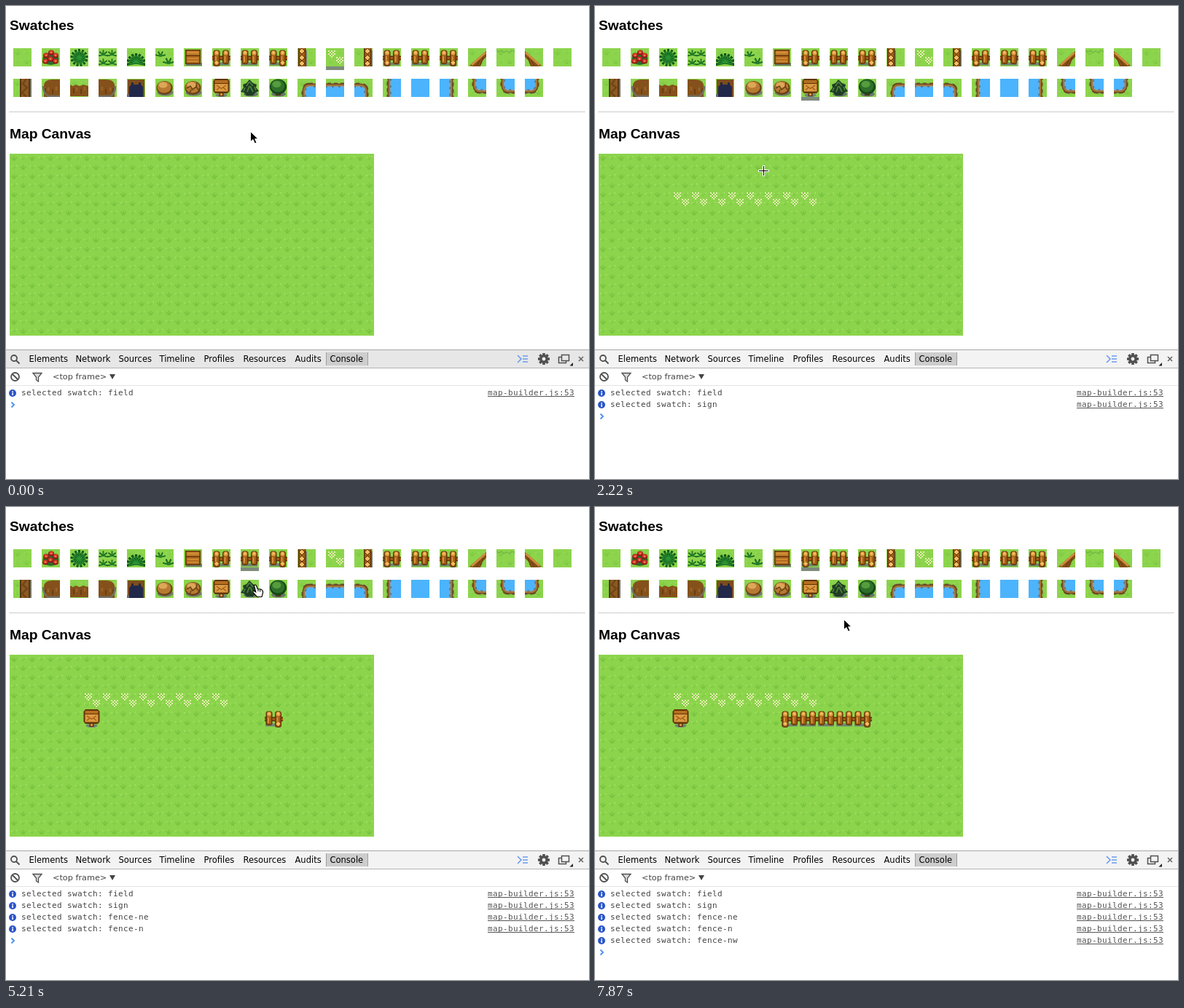
Recreate the animation shown at these times as an HTML page with a canvas. Size 800 by 650 pixels, loop 8 s.

```html
<!DOCTYPE html>
<html lang="en">
<head>
<meta charset="utf-8">
<title>Map builder</title>
<style>
html, body { margin: 0; width: 100%; height: 100%; overflow: hidden; background: #fff; }
canvas { display: block; }
</style>
</head>
<body>
<canvas id="stage" width="800" height="650"></canvas>
<script>
const ctx = document.getElementById('stage').getContext('2d');
const LOOP = 8000, TILE = 25, MAP_X = 5, MAP_Y = 203;
const UI = '"DejaVu Sans", sans-serif';
const MONO = '11px "DejaVu Sans Mono", monospace';
const WOOD = { edge: '#603408', mid: '#a35f18', light: '#d8923a', shine: '#f5bd62' };

// ---------- drawing helpers ----------
function box(color, x, y, w, h) {
  ctx.fillStyle = color;
  ctx.fillRect(x, y, w, h);
}
function oval(color, x, y, rx, ry = rx) {
  ctx.fillStyle = color;
  ctx.beginPath();
  ctx.ellipse(x, y, rx, ry, 0, 0, 7);
  ctx.fill();
}
function shape(d, fill, stroke, width = 1) {
  const path = new Path2D(d);
  if (fill) { ctx.fillStyle = fill; ctx.fill(path); }
  if (stroke) { ctx.strokeStyle = stroke; ctx.lineWidth = width; ctx.stroke(path); }
}
function text(str, x, y, font, color = '#000', spacing = 0) {
  ctx.font = font;
  ctx.letterSpacing = spacing + 'px';
  ctx.fillStyle = color;
  ctx.fillText(str, x, y);
}
function at(x, y, draw) {
  ctx.save();
  ctx.translate(x, y);
  draw();
  ctx.restore();
}
function tile(x, y, draw) {
  at(x, y, () => {
    ctx.beginPath();
    ctx.rect(0, 0, TILE, TILE);
    ctx.clip();
    draw();
  });
}

// ---------- tiles, in 25 x 25 units ----------
function grass(strength = 1) {
  box('#8cd44c', 0, 0, TILE, TILE);
  ctx.globalAlpha = strength;
  for (const [x, y] of [[6, 9], [18.5, 21.5]]) {
    shape(`M${x} ${y}l-4 -4M${x} ${y}v-6M${x} ${y}l4 -4`, null, '#79c440', 1.6);
    box('#79c440', x - 2, y - 1.5, 4, 2);
  }
  for (const [x, y] of [[18.5, 8], [6, 20.5]]) {
    shape(`M${x - 2} ${y - 2}l2 2l2 -3`, null, '#82cb46', 1.4);
    box('#a3e266', x - 4, y - 4, 1.5, 2);
    box('#a3e266', x + 3, y - 5, 1.5, 2);
  }
  ctx.globalAlpha = 1;
}
function fern(x, y, r, blades, spread) {
  for (const [color, width, length] of [['#0c5418', r / 4, 1], ['#2c9434', r / 9, 0.8]])
    for (let i = 0; i < blades; i++) {
      const a = -Math.PI / 2 + spread * (i / (blades - 1) - 0.5);
      shape(`M${x} ${y}l${Math.cos(a) * r * length} ${Math.sin(a) * r * length}`, null, color, width);
    }
}
function post(x, bottom, diamond) {
  ctx.fillStyle = WOOD.edge;
  ctx.beginPath();
  ctx.roundRect(x, 2.5, 9, bottom - 2.5, 3.5);
  ctx.fill();
  box(WOOD.mid, x + 1.5, 6, 6, bottom - 7.5);
  oval(WOOD.light, x + 4.5, 6.5, 3.2, 3.2);
  oval(WOOD.shine, x + 4.5, 6, 1.7, 2);
  box(WOOD.light, x + 2.5, 11, 2, bottom - 14);
  if (diamond) shape(`M${x + 4.5} ${bottom - 8.5}l3.5 3.5l-3.5 3.5l-3.5 -3.5z`, WOOD.shine, WOOD.mid);
}
function fence(side) {
  box('#6f8570', 1, 19.5, 22, 4);
  box(WOOD.edge, 0, 10.5, TILE, 6);
  box(WOOD.mid, 0, 12, TILE, 3);
  post(1.5, side < 0 ? 25 : 22, side < 0);
  post(14, side > 0 ? 25 : 22, side > 0);
}
function sideFence(x) {
  box('#758276', x + 10, 3, 2, 22);
  box(WOOD.edge, x, 0, 10.5, TILE);
  box(WOOD.mid, x + 1.5, 0, 7.5, TILE);
  for (const y of [4, 13, 21]) shape(`M${x + 5} ${y - 4}l4 4l-4 4l-4 -4z`, WOOD.shine, WOOD.edge);
}
function field() {
  for (const [ox, oy] of [[3, 3], [14, 12]])
    for (let i = 0; i < 5; i++)
      for (let j = 0; j < 5; j++)
        if ((i + j) % 2 === 0 && Math.abs(i - 2) + j < 5) box('#e6efb0', ox + i * 2, oy + j * 2, 2, 2);
}
function sign() {
  oval('#737f78', 12.5, 22.5, 8, 2.6);
  box(WOOD.edge, 9.5, 18, 6, 6);
  box(WOOD.light, 11, 19, 3, 4);
  shape('M4 0H21L23.5 3V17L21 20H4L1.5 17V3Z', WOOD.edge);
  box('#b56e20', 3.5, 2, 18, 4);
  box('#dc9a41', 3.5, 7, 18, 10.5);
  shape('M6 9L12.5 13.5L19 9M6 15.5L10 12M19 15.5L15 12', null, WOOD.mid, 1.4);
}
function crate() {
  box('#707c72', 3, 20, 22, 4);
  box(WOOD.edge, 2, 2, 21, 20);
  box('#c27c2c', 3.5, 3.5, 18, 6);
  box('#b36c20', 3.5, 11, 18, 9.5);
  shape('M5 6H20M5 14H20M5 18H20', null, '#d8923a', 1.3);
}
function redFlowers() {
  oval('#2b6a2c', 12.5, 14.5, 11, 8.5);
  for (const [x, y] of [[6, 10], [13, 6], [19, 10], [12, 15], [5, 18], [19, 18]]) {
    oval('#8e1717', x, y, 4, 3.6);
    oval('#d63a2c', x, y - 0.7, 3, 2.5);
    box('#f2b04e', x - 0.8, y - 1, 1.6, 1.6);
  }
}
function ramp() {
  shape('M25 4L13 14L2 24L7 25H17L19 18L25 12Z', '#875018');
  shape('M24 6L14 15L5 23', null, '#cf8c3c', 3);
  shape('M21 12L17 23M16 17L12 24', null, '#6b4010', 1.5);
}
function mirror(draw) {
  return () => { ctx.translate(TILE, 0); ctx.scale(-1, 1); draw(); };
}
function edge() {
  shape('M0 3l3 2 4-2 3 3 4-2 4 2 3-3 4 2', null, '#6fb545', 1.3);
}
function cliffSide() {
  box('#56340f', 9, 0, 14, TILE);
  box('#8d5a20', 11, 0, 10, TILE);
  shape('M18 0L13 7L19 12L12 19L18 25', null, '#70461a', 2.5);
  box('#747668', 23, 0, 2, TILE);
}
function cliffFace(corner) {
  shape(corner ? 'M3 25V8Q5 1 14 1H25V25Z' : 'M0 8l4 2 4-2 5 2 5-2 7 2V24H0Z', '#85511b');
  shape('M5 13V20M15 14V21', null, '#693f12', 2);
  shape('M9 12V17M20 11V16', null, '#9c642a', 2.5);
  if (corner) shape('M2 10Q2 20 9 24H25', null, '#707168', 2.5);
}
function cave() {
  box('#7d4d1b', 1, 1, 23, 24);
  shape('M3 25V11L6 8V5H9V8H16V5H19V8L22 11V25Z', '#22284a');
  box('#666b70', 0, 21, 3, 4);
}
function boulder(cracked) {
  oval('#737b6e', 13.5, 19, 11, 4.5);
  oval('#694014', 12.5, 12.5, 11, 9.5);
  oval('#b67a32', 12, 11.5, 9.5, 8);
  oval('#dda758', 10.5, 8.5, 6, 4);
  if (cracked) shape('M4 13l5-3 3 5 5-4 4 5M10 15l-2 5M17 12l1-7', null, '#694014', 1.5);
}
function spikyBush() {
  oval('#68756a', 14, 21, 10, 3.5);
  shape('M12 1L17 6 22 8 21 12 25 17 20 19 17 23H8L5 19 0 18 4 12 3 8 8 6Z', '#1d3d22');
  shape('M12 4L8 10M12 4L17 10M6 12L4 17M12 10L9 18M13 10L17 18M19 11L21 16', null, '#4e7e3e', 1.8);
}
function roundTree() {
  oval('#68756a', 13, 21, 10, 3.5);
  box('#5b370f', 9, 19, 7, 4);
  oval('#174719', 12.5, 11, 11.5, 10.5);
  oval('#2e7029', 12, 10, 9.5, 8.5);
  oval('#559c3d', 10.5, 7.5, 6, 4.5);
}
function water(dx, dy) {
  const left = dx < 0 ? 11 : -12, right = dx > 0 ? 14 : 37;
  const top = dy < 0 ? 11 : -12, bottom = dy > 0 ? 15 : 37;
  const shore = new Path2D();
  shore.roundRect(left, top, right - left, bottom - top, 5);
  const bank = (color, width, dash = []) => {
    ctx.strokeStyle = color;
    ctx.lineWidth = width;
    ctx.setLineDash(dash);
    ctx.stroke(shore);
  };
  bank('#6e4a24', 9);
  bank('#6e4a24', 11, [5, 4]);
  bank('#a8753a', 6);
  ctx.fillStyle = '#4bb4fd';
  ctx.fill(shore);
  bank('#4a7aa0', 1.5);
  bank('#8bd5ff', 1, [6, 3]);
  ctx.setLineDash([]);
}

const none = () => {};
const swatches = [
  [none, redFlowers,
    () => fern(12.5, 13, 12, 13, 5.8),
    () => { for (const x of [6.5, 18.5]) for (const y of [9, 21]) fern(x, y, 6.5, 5, 3.6); },
    () => fern(12.5, 20, 13, 9, 3.5),
    () => { fern(7, 11, 7, 4, 2.6); fern(18, 21, 8, 4, 2.6); },
    crate, () => fence(-1), () => fence(0), () => fence(1),
    () => sideFence(1), field, () => sideFence(13),
    () => fence(-1), () => fence(0), () => fence(1),
    ramp, edge, mirror(ramp), none],
  [cliffSide, () => cliffFace(true), () => cliffFace(false), mirror(() => cliffFace(true)),
    cave, () => boulder(false), () => boulder(true), sign, spikyBush, roundTree,
    () => water(-1, -1), () => water(0, -1), () => water(1, -1),
    () => water(-1, 0), () => water(0, 0), () => water(1, 0),
    () => water(-1, 1), () => water(-1, 1), () => water(1, 1)]
];

// ---------- story ----------
// time, swatch name, swatch column, swatch row
const selections = [
  [0, 'field', 11, 0], [2220, 'sign', 7, 1], [3870, 'fence-ne', 9, 0],
  [5060, 'fence-n', 8, 0], [6690, 'fence-nw', 7, 0]
];
// start, columns, row, sprite, end
const strokes = [
  [450, [4], 2, field], [900, [5], 2, field], [1050, [6, 7, 8], 2, field], [1190, [9, 10, 11], 2, field],
  [2520, [4], 3, sign],
  [4020, [15], 3, () => fence(1), 4170], [4170, [14], 3, () => fence(1)],
  [5800, [13], 3, () => fence(0)], [5950, [12], 3, () => fence(0)], [6090, [11], 3, () => fence(0)],
  [7430, [10], 3, () => fence(-1)]
];
// time, pointer, x, y
const pointerSteps = [
  [0, arrow, 335, 172], [150, cross, 215, 235], [300, cross, 113, 276], [450, cross, 121, 274],
  [900, cross, 157, 268], [1050, cross, 229, 270], [1190, cross, 298, 274],
  [1480, cross, 307, 235], [1630, arrow, 301, 170], [1770, hand, 294, 122], [1920, hand, 293, 109],
  [2220, cross, 231, 226], [2370, cross, 145, 279], [2520, cross, 116, 292], [2670, cross, 111, 294],
  [2970, cross, 230, 272], [3120, cross, 418, 228], [3270, arrow, 404, 150],
  [3420, hand, 376, 88], [3570, hand, 371, 74],
  [3870, arrow, 384, 182], [4020, cross, 392, 278], [4170, cross, 374, 290], [4320, cross, 367, 292],
  [4770, arrow, 350, 165], [4920, hand, 333, 82], [5060, hand, 331, 72], [5210, hand, 338, 106],
  [5360, cross, 364, 235], [5500, cross, 368, 289],
  [5800, cross, 350, 292], [5950, cross, 312, 295], [6090, cross, 281, 298],
  [6240, cross, 283, 225], [6390, hand, 289, 102], [6540, hand, 290, 67],
  [6690, hand, 291, 72], [6840, arrow, 296, 125],
  [6990, cross, 258, 240], [7140, cross, 238, 321], [7290, cross, 251, 308], [7430, cross, 262, 301],
  [7720, arrow, 315, 210], [7870, arrow, 341, 154]
];

// ---------- pointers ----------
function arrow() {
  shape('M.5 .5V14.5L4 11.5 6.5 17 9 16 6.7 10.7H11Z', '#000', '#fff');
}
function cross() {
  box('#fff', -7, -1, 15, 3);
  box('#fff', -1, -7, 3, 15);
  box('#000', -6, 0, 13, 1);
  box('#000', 0, -6, 1, 13);
}
function hand() {
  shape('M2.5 2Q4 0 5.5 2L7.2 6.5 12 7.2Q15 8.5 14.5 12L13 17.5H6.5L1 11.5Q0 9 2.5 9.5L4.7 10.7Z', '#fff', '#000', 1.2);
  shape('M8 7V10M10.7 7.5V10.5', null, '#000');
}

// ---------- page parts ----------
function drawSwatches([, , selectedColumn, selectedRow]) {
  swatches.forEach((row, r) => row.forEach((draw, c) => {
    const x = 10 + c * 39, y = 58 + r * 42;
    tile(x, y, () => { grass(0.5); draw(); });
    if (c === selectedColumn && r === selectedRow) box('#7d8b7b', x, y + TILE, TILE, 5);
  }));
}
function drawMap(t) {
  for (let r = 0; r < 10; r++)
    for (let c = 0; c < 20; c++) tile(MAP_X + c * TILE, MAP_Y + r * TILE, grass);
  for (const [start, columns, row, draw, end = LOOP] of strokes)
    if (t >= start && t < end)
      for (const c of columns) tile(MAP_X + c * TILE, MAP_Y + row * TILE, draw);
}
function drawToolbar(t) {
  box(t < 2220 ? '#e7e7e7' : '#f3f3f3', 0, 473, 800, 24);
  box('#a8a8a8', 0, 472, 800, 1);
  box('#b4b4b4', 0, 497, 800, 1);
  box('#e4e4e4', 0, 521, 800, 1);
  box('#cdcdcd', 440, 476, 56, 18);
  box('#a0a0a0', 439, 476, 1, 18);
  box('#a0a0a0', 496, 476, 1, 18);
  const tabs = { Elements: 32, Network: 96, Sources: 155, Timeline: 211, Profiles: 272, Resources: 326, Audits: 397, Console: 445 };
  for (const name in tabs) text(name, tabs[name] - 0.5, 489, '11.5px ' + UI);

  const gray = '#505050';
  shape('M15 484a4 4 0 1 0-8 0a4 4 0 1 0 8 0M14 487L18.5 491.5', null, gray, 1.8);
  shape('M702 480l5 5-5 5M709 481h7M709 485h7M709 489h7', null, '#6c9cf0', 1.6);
  at(738, 485, () => {
    for (let i = 0; i < 8; i++) { ctx.rotate(Math.PI / 4); box(gray, -1.8, -8, 3.6, 4); }
    oval(gray, 0, 0, 6);
    oval('#eee', 0, 0, 2.4);
  });
  shape('M762.5 479.5h10v8h-10zM762 482.5h-3.5v8h10V488', null, gray, 1.5);
  shape('M778 490v4.5h-4.5z', '#222');
  shape('M786 482l6 6M792 482l-6 6', null, '#666', 1.6);

  shape('M18 509.5a5.5 5.5 0 1 0-11 0a5.5 5.5 0 1 0 11 0M8.5 505.5l8 8', null, gray, 1.8);
  shape('M37 504.5H49L44.5 510V516L41.5 514V510Z', '#ddd', gray, 1.3);
  text('<top frame>', 64, 513, '11.25px ' + UI, '#444');
  shape('M142 506h8l-4 7z', '#444');
}
function drawConsole(log) {
  log.forEach(([, name], i) => {
    const y = 531 + i * 16;
    oval('#2b55c8', 9, y + 1, 5);
    box('#fff', 8.3, y - 2, 1.6, 1.6);
    box('#fff', 8.3, y + 0.3, 1.6, 3.6);
    text('selected swatch: ' + name, 21, y + 4, MONO, '#444', 0.38);
    text('map-builder.js:53', 661, y + 4, MONO, '#555', 0.38);
    box('#555', 661, y + 5, 119, 1);
  });
  const y = 532 + log.length * 16;
  shape(`M7.5 ${y - 3.5}l3.5 3.5-3.5 3.5`, null, '#4a8df0', 1.8);
}

function render(t) {
  const passed = list => list.filter(item => item[0] <= t);
  const log = passed(selections);
  box('#fff', 0, 0, 800, 650);
  const heading = 'bold 19.2px "Liberation Sans", Arial, sans-serif';
  text('Swatches', 5, 33, heading);
  text('Map Canvas', 5, 182, heading);
  for (let x = 5; x < 794; x += 2) box('#999', x, 145, 1, 1);
  drawSwatches(log.at(-1));
  drawMap(t);
  drawToolbar(t);
  drawConsole(log);
  const [, pointer, x, y] = passed(pointerSteps).at(-1);
  at(x, y, pointer);
}

const start = performance.now();
function tick() {
  render((performance.now() - start) % LOOP);
  requestAnimationFrame(tick);
}
tick();
</script>
</body>
</html>
```
